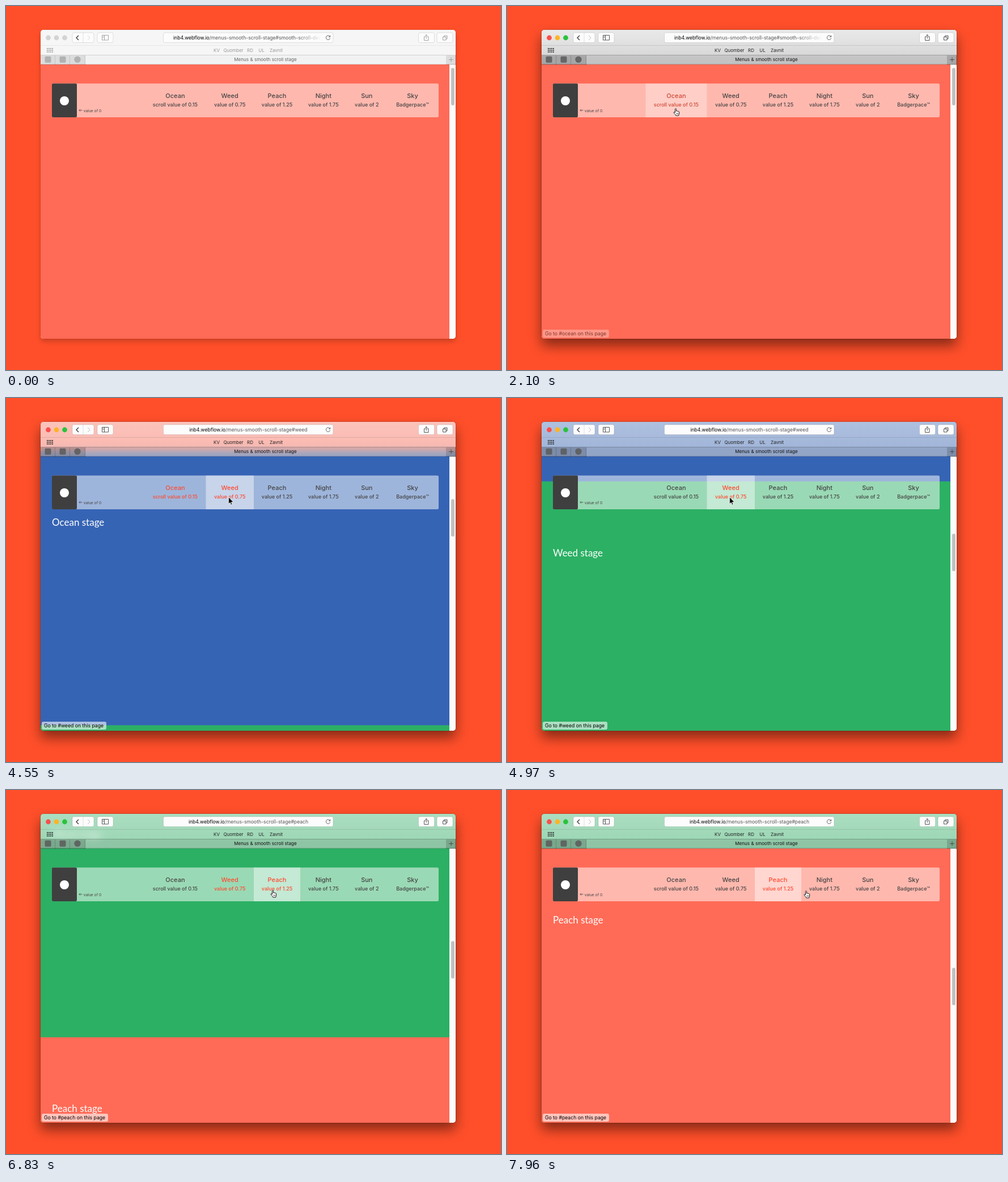
An HTML page that plays this animation: 873x641 px, repeating every 8 s.

```html
<!DOCTYPE html>
<html lang="en">
<head>
<meta charset="utf-8">
<title>Menus &amp; smooth scroll stage</title>
<style>
  html, body { margin: 0; width: 873px; height: 641px; overflow: hidden; background: #ff4f2a; }
  body { position: relative; font-family: Inter, sans-serif; }
  div, svg { position: absolute; box-sizing: border-box; }
  #shadow, #win { left: 61px; top: 42px; width: 732px; height: 544px; border-radius: 5px; }
  #shadow { box-shadow: 0 0 0 .5px rgba(0,0,0,.25), 0 12px 22px rgba(0,0,0,.48); }
  .idle #shadow { box-shadow: 0 0 0 .5px rgba(0,0,0,.12), 0 5px 10px rgba(0,0,0,.2); }
  #win { overflow: hidden; background: #fff; }
  #strip { left: 0; top: 61px; width: 732px; }
  .stage { left: 0; width: 732px; height: 483.5px; }
  .stage span { position: absolute; left: 20px; top: 114px; color: #fff; font: 17px/24px Lato, sans-serif; white-space: nowrap; }
  #blank { top: -61px; width: 732px; height: 61px; background: linear-gradient(#d0cfcf, #a8a6a6); }
  #track { left: 721px; top: 61px; width: 11px; height: 483px; background: #fcfcfc; }
  #thumb { left: 3px; width: 6px; height: 66px; border-radius: 3px; background: #c1c1c1; }
  #bar { left: 0; top: 0; width: 732px; height: 61px; backdrop-filter: blur(7px);
    background: linear-gradient(rgba(250,250,250,.62), rgba(244,244,244,.54)); }
  .idle #bar { background: #f6f6f6; }
  #tabs { left: 0; top: 44px; width: 732px; height: 17px; background: rgba(0,0,0,.08);
    border: solid rgba(0,0,0,.2); border-width: .5px 0; }
  .idle #tabs { background: rgba(0,0,0,.015); border-color: rgba(0,0,0,.13); }
  .pin { top: 0; height: 17px; background: rgba(0,0,0,.15); border-right: 1px solid rgba(0,0,0,.17); }
  .idle .pin { background: rgba(0,0,0,.09); border-color: rgba(0,0,0,.1); }
  #tip { left: 2px; top: 528px; height: 14px; padding: 0 5px 0 4px; border-radius: 3px; color: #000;
    background: rgba(255,255,255,.6); font-size: 8.67px; line-height: 14px; white-space: nowrap; }
  #url { left: 278px; top: 47px; width: 299px; height: 18px; font-size: 8.6px; line-height: 18px;
    text-align: center; white-space: nowrap; overflow: hidden; color: #555; }
  #url b { font-weight: 400; color: #000; }
  #url.long { left: 295px; width: 261px; text-align: left; mask-image: linear-gradient(90deg, #000 84%, transparent); }
  svg { left: 0; top: 0; }
  .btn { fill: #fcfcfc; stroke: rgba(0,0,0,.16); stroke-width: .7; }
  .ico { fill: none; stroke: #444; stroke-width: .9; }
  .idle .ico { stroke: #999; }
  .label { fill: #222; font-size: 8px; }
  .idle .label { fill: #999; }
  .title { fill: #111; font-size: 8.1px; }
  .idle .title { fill: #666; }
  .fav { fill: #5a5a5a; fill-opacity: .85; }
  .idle .fav { fill: #aaa; }
  .idle .light { fill: #d3d3d3; }
  text { text-anchor: middle; }
  .menu { font-weight: 500; }
</style>
</head>
<body class="idle">
<div id="shadow"></div>
<div id="win">
  <div id="strip"><div id="blank"></div></div>
  <div id="track"><div id="thumb"></div></div>
  <div id="bar"><div id="tabs">
    <div class="pin" style="left:0;width:26px"></div>
    <div class="pin" style="left:26px;width:26px"></div>
    <div class="pin" style="left:52px;width:27px"></div>
    <div class="pin" style="left:715px;width:17px"></div>
  </div></div>
  <div id="tip"></div>
</div>
<svg width="873" height="641">
  <g id="lights"></g>
  <path class="ico" stroke-opacity=".25" d="M61 69.5H793" style="stroke-width:.6"/>
  <g class="btn">
    <rect x="117" y="47" width="38" height="17.5" rx="3"/>
    <path d="M136 47v17.5"/>
    <rect x="161" y="47" width="28" height="17.5" rx="3"/>
    <rect x="277.5" y="47" width="299.5" height="17.5" rx="3"/>
    <rect x="727.5" y="47" width="28" height="17.5" rx="3"/>
    <rect x="760" y="47" width="28" height="17.5" rx="3"/>
  </g>
  <g class="ico">
    <path d="M128 52l-4 4 4 4" style="stroke:#333;stroke-width:1.3"/>
    <path d="M144 52l4 4-4 4" opacity=".4"/>
    <path d="M169.500 51.500h11v8.500h-11zM173.500 51.500v8.500M170.700 53.500h1.600M170.700 55.500h1.600"/>
    <path d="M571.400 54a3.700 3.700 0 1 0 .3 2.600M571.700 51.800v2.600h-2.600" style="stroke:#555"/>
    <path d="M740 54h-2.500v6.500h7.500V54h-2.500M741.200 57.500V50.500M739.200 52.400l2-2 2 2"/>
    <path d="M770.500 54.500h5.500v5.500h-5.500zM772.500 54.500v-2.200h5.500v5.500h-2"/>
    <path d="M781 94.500h8M785 90.500v8"/>
  </g>
  <g id="grid" class="label"></g>
  <g id="marks" class="label"></g>
  <text class="title" x="457.500" y="97.300">Menus &amp; smooth scroll stage</text>
  <rect class="fav" x="68.500" y="88.800" width="11" height="11" rx="2"/>
  <rect class="fav" x="94.500" y="88.800" width="11" height="11" rx="2"/>
  <circle class="fav" cx="126" cy="94.300" r="5.700"/>

  <rect x="81" y="136.500" width="682" height="59.500" rx="2.500" fill="#fff" fill-opacity=".52"/>
  <rect x="81" y="136.500" width="44" height="59.500" rx="2" fill="#3f3f3f"/>
  <circle cx="103" cy="167" r="8" fill="#fff"/>
  <path d="M134.500 183.700h-5.500m2-2l-2 2 2 2" fill="none" stroke="#444" stroke-width=".8"/>
  <text x="152.500" y="186.500" font-size="6.700" fill="#444">value of 0</text>
  <g id="menu" class="menu"></g>
</svg>
<div id="url"></div>
<svg width="873" height="641">
  <g id="cursor">
    <path id="arrow" d="M0 0V12.200L2.800 9.600 4.600 13.700 6.500 12.900 4.800 8.900H8.600Z" fill="#000" stroke="#fff" stroke-width=".8"/>
    <g id="hand" transform="translate(-3.500 0)" stroke="#000" stroke-width=".9" stroke-linejoin="round">
      <path fill="#fff" d="M3 1.600C3 .3 5 .3 5 1.600V5.200C5.200 4.400 6.800 4.500 6.800 5.500 7.200 4.800 8.500 5 8.500 6 9.200 5.400 10.200 5.800 10.200 6.800V9.200C10.200 10.600 9.400 11.200 9.200 13H4.400C4 11.400 2 10 .8 8 .2 7 1.400 6.200 2.200 7L3 7.800Z"/>
      <path stroke-width=".6" d="M5.300 8.500v2.300M6.900 8.500v2.300M8.400 8.500v2.300"/>
    </g>
  </g>
</svg>
<script>
const LOOP = 8000, PAGE = 483;
const $ = id => document.getElementById(id);
const clamp = v => Math.max(0, Math.min(1, v));
const cubic = p => p < .5 ? 4 * p ** 3 : 1 - 4 * (1 - p) ** 3;
const smooth = p => p * p * (3 - 2 * p);

function svg(tag, attrs, parent, text = '') {
  const el = document.createElementNS('http://www.w3.org/2000/svg', tag);
  for (const k in attrs) el.setAttribute(k, attrs[k]);
  el.textContent = text;
  return parent.appendChild(el);
}

// Page sections
[['', '#ff6b57'], ['Ocean stage', '#3664b4'], ['Weed stage', '#2cb064'], ['Peach stage', '#ff6b57']]
  .forEach(([name, color], i) => {
    const el = document.createElement('div');
    el.className = 'stage';
    el.style.cssText = `top:${i * PAGE}px;background:${color}`;
    el.innerHTML = `<span>${name}</span>`;
    $('strip').append(el);
  });

// Window furniture
['#fc4f4b', '#fdb427', '#2ac23c'].forEach((fill, i) =>
  svg('circle', { class: 'light', cx: 74.5 + 14.5 * i, cy: 56, r: 4.4, fill }, $('lights')));
for (let i = 0; i < 12; i++)
  svg('rect', { x: 72 + i % 4 * 3, y: 74 + Math.floor(i / 4) * 3, width: 1.8, height: 1.8 }, $('grid'));
[['KV', 371.5], ['Quomber', 401], ['RD', 430.5], ['UL', 450.5], ['Zavnit', 476.5]]
  .forEach(([name, x]) => svg('text', { x, y: 80.5 }, $('marks'), name));

// Menu: name, note, left, right, text centre, hover start, hover end
const NEVER = 1e9;
const items = [
  ['Ocean', 'scroll value of 0.15', 244.5, 352.5, 298.4, 1820, 3590],
  ['Weed', 'value of 0.75', 352.5, 437, 394.7, 3590, 5410],
  ['Peach', 'value of 1.25', 437, 519, 478, 5410, NEVER],
  ['Night', 'value of 1.75', 519, 601, 559.8, NEVER, NEVER],
  ['Sun', 'value of 2', 601, 672, 636.3, NEVER, NEVER],
  ['Sky', 'Badgerpace™', 672, 763, 717, NEVER, NEVER]
].map(([name, note, left, right, x, on, off]) => {
  const g = svg('g', {}, $('menu'));
  const back = svg('rect', { x: left, y: 136.5, width: right - left, height: 59.5, fill: '#fff' }, g);
  svg('text', { x, y: 162, 'font-size': 11 }, g, name);
  svg('text', { x, y: 177, 'font-size': 9 }, g, note);
  return { g, back, name, on, off };
});

// Clicks: start, duration, anchor
const clicks = [[2740, 154, 'ocean'], [4419, 770, 'weed'], [6283, 1283, 'peach']];

// Pointer path: time, x, y
const path = [
  [350, 334, 646], [1110, 270, 165], [1250, 270, 165], [1870, 297, 180], [2700, 297, 180],
  [3150, 303, 174], [3460, 303, 174], [3800, 392.5, 174.5], [5150, 392.5, 174.5],
  [5660, 462.5, 177], [5870, 462.5, 177], [6160, 470, 176], [7500, 470, 176],
  [7900, 508, 177], [7959, 508, 177], [7960, 527, 177]
];

function pointer(t) {
  const i = path.findIndex(p => p[0] > t);
  if (i < 1) return path[i ? path.length - 1 : 0].slice(1);
  const [a, b] = [path[i - 1], path[i]];
  const p = smooth((t - a[0]) / (b[0] - a[0]));
  return [a[1] + (b[1] - a[1]) * p, a[2] + (b[2] - a[2]) * p];
}

let anchor;
function setUrl(next) {
  if (next === anchor) return;
  anchor = next;
  $('url').className = next.length > 9 ? 'long' : '';
  $('url').innerHTML = `<b>inb4.webflow.io</b>/menus-smooth-scroll-stage#${next}`;
}

function render(t) {
  document.body.className = t < 1170 ? 'idle' : '';

  let scroll = 0, hash = 'smooth-scroll-demo';
  for (const [start, time, name] of clicks) {
    if (t < start) break;
    scroll += PAGE * cubic(clamp((t - start) / time));
    hash = name;
  }
  $('strip').style.transform = `translateY(${-scroll}px)`;
  $('thumb').style.top = 6 + scroll * 68 / PAGE + 'px';
  setUrl(hash);

  const current = Math.round(scroll / PAGE) - 1;
  let over = items[0];
  items.forEach((it, i) => {
    const h = clamp((t - it.on) / 380) - clamp((t - it.off) / 380);
    const red = i === current ? 1 : h;
    it.back.setAttribute('fill-opacity', .42 * h);
    it.g.style.fill = `color-mix(in srgb, #ff4a30 ${red * 100}%, #444)`;
    if (t >= it.on) over = it;
  });
  $('tip').textContent = `Go to #${over.name.toLowerCase()} on this page`;
  $('tip').style.opacity = clamp((t - 2000) / 200);

  const [x, y] = pointer(t);
  const hand = t >= 1250 && t < 3500 || t >= 5200;
  $('cursor').setAttribute('transform', `translate(${x} ${y})`);
  $('arrow').style.display = hand ? 'none' : '';
  $('hand').style.display = hand ? '' : 'none';
}

const begin = performance.now();
function frame() {
  render((performance.now() - begin) % LOOP);
  requestAnimationFrame(frame);
}
frame();
</script>
</body>
</html>
```
